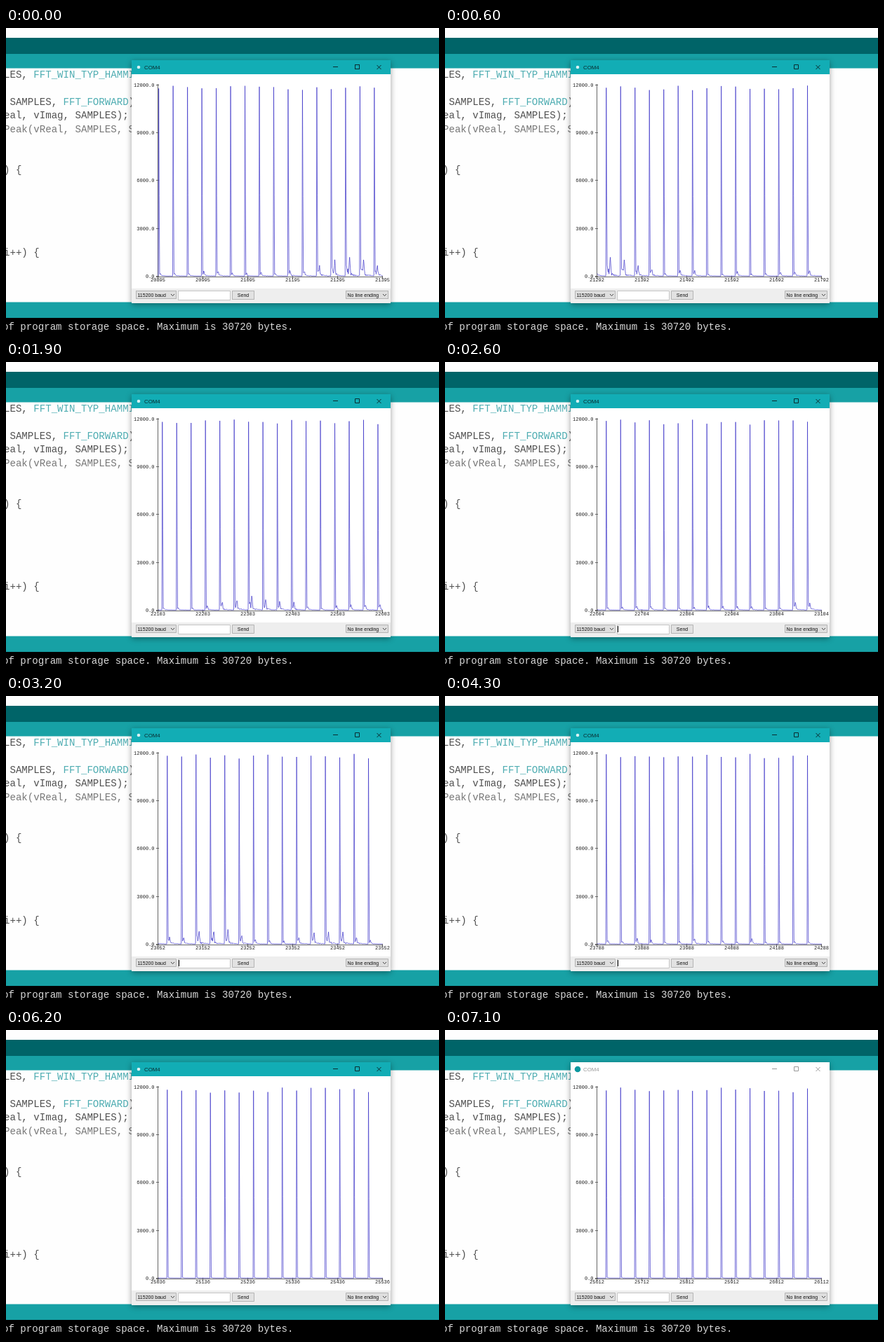
Write an HTML page with a canvas that moves like this. It is 617 by 437 pixels and loops after 7200 ms.

```html
<!DOCTYPE html>
<html lang="en">
<head>
<meta charset="utf-8">
<title>Serial plotter</title>
<style>
html, body { margin: 0; width: 617px; height: 437px; overflow: hidden; background: #fff; }
canvas { display: block; }
</style>
</head>
<body>
<canvas id="stage" width="617" height="437"></canvas>
<script>
const ctx = document.getElementById('stage').getContext('2d');
const LOOP = 7200, STEP = 100;
const MONO = '"Liberation Mono", monospace', SANS = '"Liberation Sans", sans-serif';

// Each transform prints a block of 32 bins.
const BINS = 32, SPAN = 500, LAST_NOISY = 770;
// Sounds picked up by the microphone: block and loudness
const SOUNDS = [[666, 1050], [685, 400], [697, 800], [724, 750], [732, 600]];
// Time and first visible sample
const SCROLL = [[0, 20895], [1200, 21676], [1900, 22103], [3200, 23052], [7100, 25612]];

const random = n => {
  const v = Math.sin(n * 12.9898) * 43758.5453;
  return v - Math.floor(v);
};

function loudness(block) {
  if (block > LAST_NOISY) return 30;
  const swell = SOUNDS.reduce((sum, [at, level]) =>
    sum + level * Math.exp(-(((block - at) / 2) ** 2)), 0);
  return 100 + 300 * random(block + 0.5) ** 2 + swell * (0.7 + 0.4 * random(block + 0.2));
}

// The Hamming window leaks the constant level of bin 0 into bin 1.
function sample(i) {
  const block = Math.floor(i / BINS), bin = i % BINS;
  const level = 11650 + 330 * random(block);
  if (bin === 0) return level;
  if (bin === 1) return level * 0.43;
  const peak = loudness(block);
  const bump = Math.exp(-(((bin - 3 - peak / 200) / 1.4) ** 2));
  const shoulder = 0.7 * Math.exp(-bin / 2.5);
  const hiss = 0.5 * random(i) * Math.exp(-bin / 11);
  return 35 + peak * (0.8 * bump + shoulder + hiss);
}

// Data arrives in bursts, so the view mostly rests on whole blocks.
function firstSample(t) {
  const next = SCROLL.findIndex(([time]) => time >= t);
  const [t1, s1] = SCROLL[next];
  if (t1 === t) return s1;
  const [t0, s0] = SCROLL[next - 1];
  const s = s0 + (s1 - s0) * (t - t0) / (t1 - t0);
  return Math.round((s - 12) / BINS) * BINS + 12;
}

function rect(x, y, w, h, fill, stroke) {
  ctx.fillStyle = fill;
  ctx.fillRect(x, y, w, h);
  if (stroke) {
    ctx.strokeStyle = stroke;
    ctx.lineWidth = 1;
    ctx.strokeRect(x + 0.5, y + 0.5, w - 1, h - 1);
  }
}

function text(str, x, y, size, color, family = SANS, align = 'left') {
  ctx.font = `${size}px ${family}`;
  ctx.fillStyle = color;
  ctx.textAlign = align;
  ctx.fillText(str, x, y);
}

function line(points, color, width = 1) {
  ctx.beginPath();
  points.forEach(([x, y]) => ctx.lineTo(x, y));
  ctx.strokeStyle = color;
  ctx.lineWidth = width;
  ctx.stroke();
}

function drawEditor() {
  rect(0, 0, 617, 437, '#fefefe');
  rect(0, 14, 617, 23, '#006468');
  rect(0, 37, 617, 20.5, '#17a1a5');
  rect(0, 391.5, 617, 22.5, '#17a1a5');
  rect(0, 414, 617, 23, '#000');

  const code = (str, y, color = '#505050') => text(str, -3, y, 14.1, color, MONO);
  const teal = '#4fadb2';
  code('LES,', 70.5);
  code('     FFT_WIN_TYP_HAMMING', 70.5, teal);
  code(' SAMPLES,            );', 109.5);
  code('          FFT_FORWARD', 109.5, teal);
  code('eal, vImag, SAMPLES);', 129);
  code('Peak(vReal, SAMPLES, S', 148.5, '#777');
  code(') {', 207);
  code('i++) {', 325);
  text('of program storage space. Maximum is 30720 bytes.', -5, 431, 14.1, '#d8d8d8', MONO);
}

function drawWindow(active, caret) {
  ctx.save();
  ctx.shadowColor = 'rgba(0,0,0,.38)';
  ctx.shadowBlur = 8;
  ctx.shadowOffsetY = 2;
  rect(179, 46, 369, 347, '#fff');
  ctx.restore();

  rect(179, 46, 369, 20, active ? '#12adb5' : '#fff');
  const ink = active ? '#0a2c30' : '#999';
  ctx.beginPath();
  ctx.arc(189, 56, active ? 2.3 : 4.3, 0, 7);
  ctx.fillStyle = active ? '#d8f2f3' : '#0b989f';
  ctx.fill();
  text('COM4', 197, 59, 7.8, ink);
  line([[466, 55.5], [473, 55.5]], ink);
  ctx.strokeRect(497.5, 52.5, 6, 6);
  line([[528.5, 53], [534.5, 59]], ink);
  line([[534.5, 53], [528.5, 59]], ink);

  rect(179, 372, 369, 21, '#eee');
  const combo = (x, w, label) => {
    rect(x, 375, w, 12, '#dedede', '#b4b4b4');
    text(label, x + 2.5, 383.5, 7, '#111');
    line([[x + w - 8, 380], [x + w - 5.5, 382.5], [x + w - 3, 380]], '#444');
  };
  combo(185, 58, '115200 baud');
  combo(484, 61, 'No line ending');
  rect(245, 375, 75, 14, '#fff', '#c4c4c4');
  if (caret) rect(246, 377, 1, 9, '#000');
  rect(322, 375, 32, 13, '#e2e2e2', '#b4b4b4');
  text('Send', 338, 384, 7, '#111', SANS, 'center');
}

function drawPlot(first) {
  const axis = '#666', label = '#222';
  const px = i => 217 + i * 0.64, py = v => 355 - v * 273.3 / 12000;
  line([[216.5, 80], [216.5, 357]], axis);
  line([[214, 355.5], [537, 355.5]], axis);
  for (let v = 0; v <= 12000; v += 3000) {
    const y = Math.round(py(v)) - 0.5;
    line([[214, y], [218, y]], axis);
    text(v.toFixed(1), 211.5, y + 2.7, 7, label, MONO, 'right');
  }
  for (let i = 0; i <= SPAN; i += 100) {
    const x = px(i) - 0.5;
    line([[x, 354], [x, 358]], axis);
    text(first + i, x, 362, 7, label, MONO, 'center');
  }
  const points = Array.from({ length: SPAN }, (_, i) => [px(i), py(sample(first + i))]);
  ctx.lineJoin = 'round';
  line(points, '#3a32c8', 0.7);
}

function frame(now) {
  const t = Math.floor(now % LOOP / STEP) * STEP;
  const caret = (t + 1050) % 1060 < 530;
  drawEditor();
  drawWindow(t < 6900, caret);
  drawPlot(firstSample(t));
  requestAnimationFrame(frame);
}
requestAnimationFrame(frame);
</script>
</body>
</html>
```
